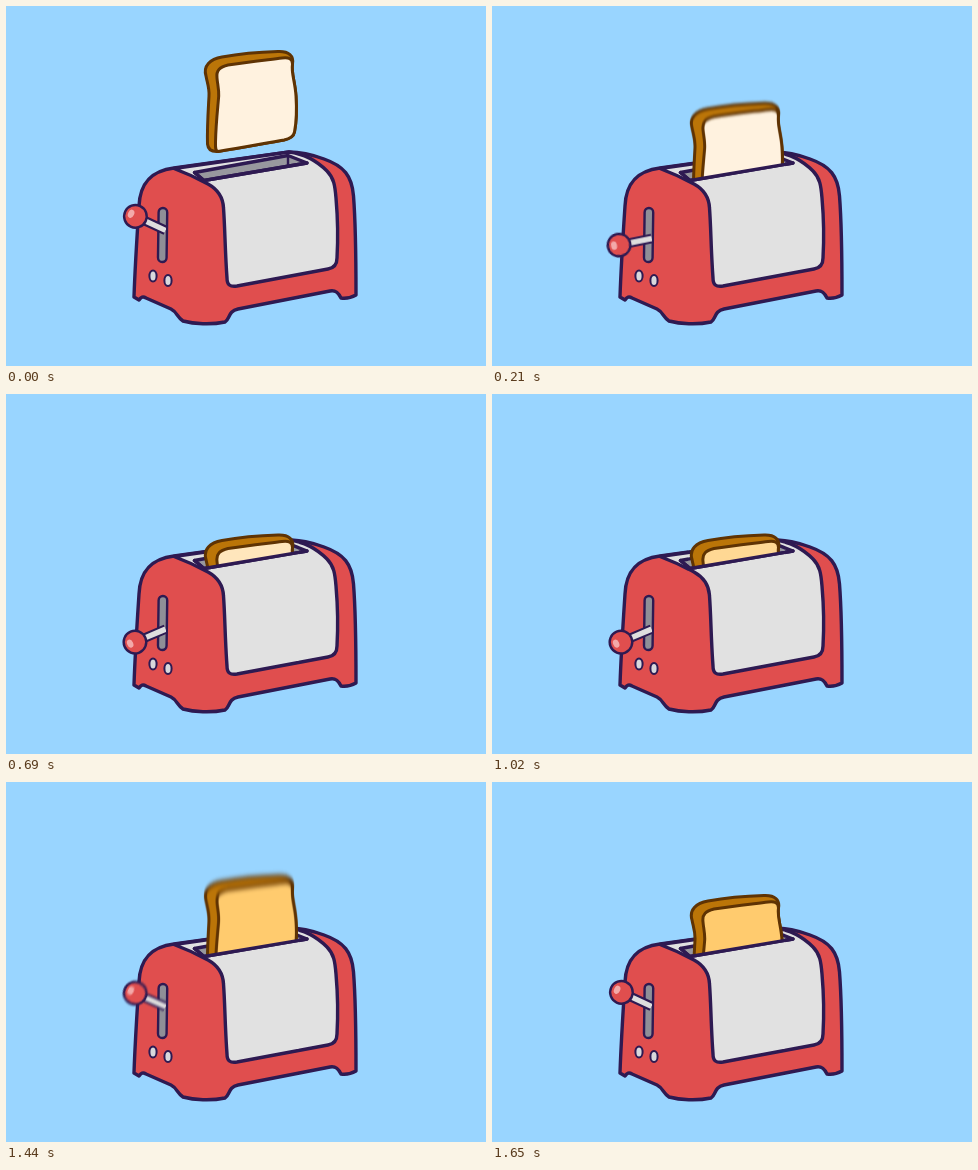
Animation, 480 px wide and 360 px high, one loop 2.19 s. Source, as an HTML page:

```html
<!DOCTYPE html>
<html lang="en">
<head>
<meta charset="utf-8">
<title>Toaster</title>
<style>
  html, body { margin: 0; width: 100%; height: 100%; overflow: hidden; background: #99d5ff; }
  svg { display: block; width: 100%; height: 100%; }
  .ink { stroke: #2e1a52; stroke-width: 3.4; stroke-linejoin: round; stroke-linecap: round; }
  .thin { stroke-width: 2.4; }
  .crumb { stroke: #5f3303; stroke-width: 3; stroke-linejoin: round; }
</style>
</head>
<body>
<svg viewBox="0 0 480 360">
  <defs>
    <filter id="breadBlur" filterUnits="userSpaceOnUse" x="180" y="20" width="130" height="150" color-interpolation-filters="sRGB">
      <feGaussianBlur stdDeviation="0 0"/>
    </filter>
    <filter id="leverBlur" filterUnits="userSpaceOnUse" x="-60" y="-40" width="80" height="80" color-interpolation-filters="sRGB">
      <feGaussianBlur stdDeviation="0 0"/>
    </filter>
    <clipPath id="aboveSlot"><path d="M0 0H480V126L301 157L198 174.5L188 167L0 200Z"/></clipPath>
    <clipPath id="leftOfSlot"><path d="M0 0H160V360H0Z"/></clipPath>
  </defs>

  <!-- body -->
  <path class="ink" fill="#e04e4e" d="M128 291C129 262 131 230 133 200C134 178 144 165 168 162L283 146C296 146 307 149 318 153
    C338 160 346 170 347.5 190C350 222 350 255 350 289Q343 293 335 292C332 286 329 284 324 285L232 303
    C222 305 224 313 219 316C205 319 188 318 177 315C171 311 171 306 165 303L140 292C137 290 135 291 133 294Z"/>
  <path class="ink" fill="#e1e1e1" stroke-width="3" d="M168 162.500L283 146C299 148 312 156 321 165C328 172 329 180 330 192
    C332 215 332 235 331 252C331 259 328 262 322 263L231 280C224 281 221 279 221 272C219 245 219 222 217.500 202
    C217 190 211 183 202 178C191 172 180 167 168 162.500Z"/>
  <path class="ink" fill="#98989e" d="M188.500 166.500L282 149.500L301 157L198 174.500Z"/>
  <path class="ink thin" fill="none" d="M282 150V159"/>

  <g clip-path="url(#aboveSlot)">
    <g id="bread"><g id="slice">
      <path class="crumb" fill="#bb7508" d="M200 70C197 60 204 53 216 51C235 47.500 255 46 272 45.500C283 45 288 50 286.500 58
        C285 67 289 75 290 90C291 105 290 118 288.500 126C287.500 131 283 133 278 134C255 138 235 142 212 145.500
        C205 146 202 143 201.500 138C201 120 202.500 100 203 90C203.500 82 201 76 200 70Z"/>
      <path id="face" class="crumb" fill="#fff2df" d="M211 72C210 64 214 61 222 59C240 56 260 54 276 52C283 51 286.500 53 286.500 58
        C285 67 289 75 290 90C291 105 290 118 288.500 126C287.500 131 283 133 278 134C255 138 235 142 212 145.500
        C209 145 209.500 140 209.500 136C210 115 212 100 212.700 90C213 83 211.500 78 211 72Z"/>
    </g></g>
  </g>
  <path class="ink" fill="none" d="M188.500 166.500L198 174.500L301 157"/>

  <!-- controls -->
  <rect class="ink thin" x="152.300" y="202" width="8.600" height="54" rx="4.300" fill="#8f8f97" transform="rotate(.8 156.500 229)"/>
  <ellipse class="ink" style="stroke-width:2" cx="147" cy="270" rx="3.600" ry="5.600" fill="#d8d8dc"/>
  <ellipse class="ink" style="stroke-width:2" cx="162" cy="274.500" rx="3.600" ry="5.600" fill="#d8d8dc"/>
  <g clip-path="url(#leftOfSlot)">
    <g id="lever"><g id="knob">
      <path d="M-24 0H1" stroke="#2e1a52" stroke-width="9.500"/>
      <path d="M-24 0H1" stroke="#dedede" stroke-width="5.400"/>
      <circle class="ink thin" cx="-32.300" cy="0" r="11.300" fill="#e04e4e"/>
      <ellipse cx="-37.300" cy="-.5" rx="3" ry="4.300" fill="#f3a9a9"/>
    </g></g>
  </g>
</svg>
<script>
const LOOP = 2190;
// [time in ms, value], eased between neighbours
const BREAD_Y = [[0, 0], [400, 95.5], [1350, 95.5], [1485, 33], [1585, 74], [1650, 68]];
const LEVER = [[0, 0], [310, 1], [1350, 1], [1450, 0]];
const TOASTING = [400, 1340];
const PALE = [255, 242, 223], BROWN = [255, 203, 110];

const $ = id => document.getElementById(id);
const clamp = x => Math.min(1, Math.max(0, x));
const mix = (a, b, k) => a + (b - a) * k;
const smooth = x => x * x * (3 - 2 * x);

function valueAt(keys, t) {
  const next = keys.findIndex(([time]) => time > t);
  if (next < 0) return keys[keys.length - 1][1];
  if (next === 0) return keys[0][1];
  const [t0, a] = keys[next - 1], [t1, b] = keys[next];
  return mix(a, b, smooth((t - t0) / (t1 - t0)));
}

const speedAt = (keys, t) => Math.abs(valueAt(keys, t + 1) - valueAt(keys, Math.max(0, t - 1))) / 2;

// Vertical motion blur in proportion to speed
function blur(id, target, sigma) {
  $(id).firstElementChild.setAttribute('stdDeviation', `0 ${sigma.toFixed(2)}`);
  if (sigma > 0.15) target.setAttribute('filter', `url(#${id})`);
  else target.removeAttribute('filter');
}

function draw(t) {
  const y = valueAt(BREAD_Y, t);
  $('bread').setAttribute('transform', `translate(0 ${y})`);
  blur('breadBlur', $('slice'), 4.5 * speedAt(BREAD_Y, t));

  const k = valueAt(LEVER, t);
  $('lever').setAttribute('transform', `translate(158.7 ${mix(224, 235.5, k)}) rotate(${mix(25, -23, k)})`);
  blur('leverBlur', $('knob'), 4.5 * 38 * speedAt(LEVER, t));

  const toast = clamp((t - TOASTING[0]) / (TOASTING[1] - TOASTING[0]));
  $('face').setAttribute('fill', `rgb(${PALE.map((c, i) => Math.round(mix(c, BROWN[i], toast)))})`);
}

const start = performance.now();
function tick() {
  draw((performance.now() - start) % LOOP);
  requestAnimationFrame(tick);
}
draw(0);
requestAnimationFrame(tick);
</script>
</body>
</html>
```
